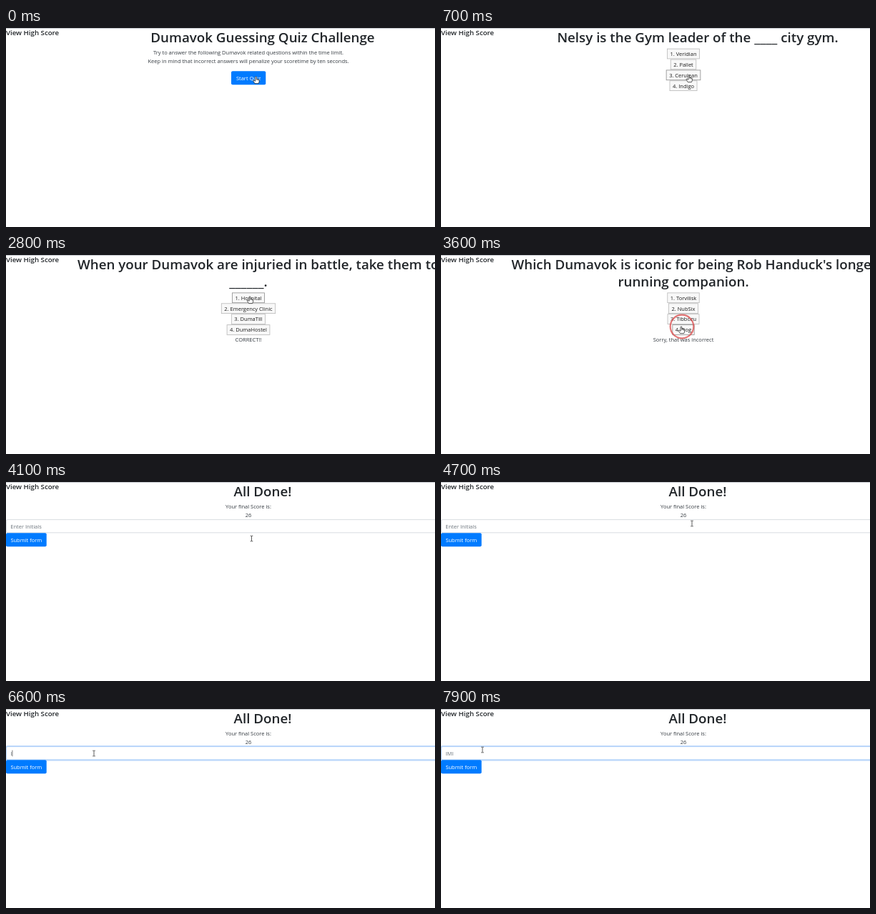
Write an HTML page that moves like this. It is 600x278 px and loops after 8000 ms.

```html
<!DOCTYPE html>
<html lang="en">
<head>
<meta charset="utf-8">
<title>Quiz</title>
<style>
  html, body { margin: 0; width: 100%; height: 100%; overflow: hidden; background: #fff; }
  svg { display: block; width: 600px; height: 278px; font: 7.5px "Open Sans", "Noto Sans", sans-serif; }
  text { fill: #343a40; white-space: pre; }
  .h1 { font-size: 18.75px; font-weight: 600; fill: #212529; }
  .nav { font-size: 9.7px; font-weight: 600; fill: #212529; }
  .mid { text-anchor: middle; }
  .label { fill: #1c1c1c; }
  .light { fill: #fff; }
  .hint { fill: #6c757d; }
  .blue { fill: #007bff; }
  .opt { fill: #f8f8f8; stroke: #b8b8b8; stroke-width: .8; }
  .opt.hot { stroke: #8c8c8c; }
  .field { fill: #fff; stroke: #ced4da; stroke-width: .8; }
  .glow { fill: none; stroke: #c0dafb; stroke-width: 2.6; }
  .field.on { stroke: #a6cbf9; }
</style>
</head>
<body>
<svg id="stage" viewBox="0 0 600 278">
  <rect width="600" height="1" fill="#c3c6cb"/>
  <text class="nav" x="0" y="10.3">View High Score</text>
  <g id="scenes"></g>
  <circle id="ring" fill="none" stroke="#dd5454" stroke-width="2.2"/>
  <g id="hand">
    <path d="M-.9 .4Q0-.7 .9 .4V3.3L2.2 3.4 3.5 3.8 4.6 4.5V7.2L3.7 9.6H-1.5L-3.7 6.1Q-3.9 4.9-2.7 5.1L-.9 6.3Z"
      fill="#fff" stroke="#222" stroke-width=".75" stroke-linejoin="round"/>
    <path d="M.9 3.3V5.2M2.3 3.6V5.3M3.5 3.9V5.4" stroke="#222" stroke-width=".5"/>
  </g>
  <path id="beam" d="M-1.8-3.8H-.5L0-3.4L.5-3.8H1.8M0-3.4V3.4M-1.8 3.8H-.5L0 3.4L.5 3.8H1.8"
    fill="none" stroke="#333" stroke-width=".8"/>
</svg>
<script>
const $ = id => document.getElementById(id);
const MID = 339, HEAD = 359, LOOP = 8000, STEP = 100;

function add(parent, tag, attrs, label) {
  const el = document.createElementNS("http://www.w3.org/2000/svg", tag);
  for (const k in attrs) el.setAttribute(k, attrs[k]);
  if (label !== undefined) el.textContent = label;
  return parent.appendChild(el);
}
const scene = () => add($("scenes"), "g", {});
const show = (el, on) => el.setAttribute("visibility", on ? "visible" : "hidden");
const centred = (g, y, s, x = MID, cls = "mid") => add(g, "text", { class: cls, x, y }, s);
const heading = (g, y, s, x = HEAD) => centred(g, y, s, x, "h1 mid");

function button(g, x, y, w, label) {
  add(g, "rect", { class: "blue", x, y, width: w, height: 19, rx: 2 });
  centred(g, y + 12.5, label, x + w / 2, "light mid");
}

// Stacked answer buttons sized to their labels, with a feedback line below
function answers(g, top, labels, hot) {
  labels.forEach((s, i) => {
    const y = top + i * 14.9;
    const box = add(g, "rect", { class: i === hot ? "opt hot" : "opt", y, height: 13.8 });
    const label = centred(g, y + 9.7, `${i + 1}. ${s}`, MID, "label mid");
    const w = label.getComputedTextLength() + 8;
    box.setAttribute("x", MID - w / 2);
    box.setAttribute("width", w);
  });
  return centred(g, top + 68.2, "");
}

const intro = scene();
heading(intro, 20.4, "Dumavok Guessing Quiz Challenge");
centred(intro, 37.3, "Try to answer the following Dumavok related questions within the time limit.");
centred(intro, 49.3, "Keep in mind that incorrect answers will penalize your scoretime by ten seconds.");
button(intro, 315, 60.3, 48.3, "Start Quiz");

const gym = scene();
heading(gym, 20.4, "Nelsy is the Gym leader of the ____ city gym.");
const gymNote = answers(gym, 29.1, ["Veridian", "Pallet", "Cerulean", "Indigo"], 2);

const care = scene();
add(care, "text", { class: "h1", x: 100, y: 20.4 }, "When your Dumavok are injuried in battle, take them to");
heading(care, 44.2, "______.", MID);
const careNote = answers(care, 52.9, ["Hospital", "Emergency Clinic", "DumaTill", "DumaHostel"], 0);

const pal = scene();
add(pal, "text", { class: "h1", x: 98.5, y: 20.4 }, "Which Dumavok is iconic for being Rob Handuck's longest");
heading(pal, 44.2, "running companion.", MID);
const palNote = answers(pal, 52.9, ["Torvilisk", "NubSix", "Tibbozu", "Dog"], 3);

const done = scene();
heading(done, 20.4, "All Done!");
centred(done, 37.3, "Your final Score is:");
centred(done, 49.3, "26");
const glow = add(done, "rect", { class: "glow", x: .4, y: 52.2, width: 678, height: 19, rx: 2.4 });
const field = add(done, "rect", { x: .4, y: 52.6, width: 678, height: 18.2, rx: 2 });
const entry = add(done, "text", { class: "hint", x: 6.3, y: 64.8 });
const caret = add(done, "rect", { y: 57.6, width: .7, height: 8.6, fill: "#444" });
button(done, 0, 71.2, 56.7, "Submit form");

const WRONG = "Sorry, that was incorrect";
const scenes = [[0, intro], [400, gym], [2400, care], [3200, pal], [4100, done]];
const clicks = [200, 1300, 2900, 3400, 5500];
const FOCUS = 5600;
const typed = [[0, "Enter Initials"], [6500, "I"], [6900, "IM"], [7200, "IMI"]];
const path = [
  [0, 349.5, 68], [400, 349.5, 68], [1000, 344, 64], [2200, 344, 64], [2700, 341, 58],
  [3000, 341, 58], [3400, 336, 100], [3800, 336, 100], [4400, 351, 58], [5000, 351, 58],
  [5500, 123, 62], [7300, 123, 62], [7900, 58, 57], [8000, 58, 57]
];

const latest = (list, t) => list.filter(e => e[0] <= t).pop()[1];

function pointer(t) {
  const i = path.findIndex(p => p[0] > t), [a, x, y] = path[i - 1], [b, u, v] = path[i];
  const k = (t - a) / (b - a), e = k * k * (3 - 2 * k);
  return [x + (u - x) * e, y + (v - y) * e];
}

function draw(t) {
  const now = latest(scenes, t);
  for (const [, g] of scenes) g.style.display = g === now ? "" : "none";
  gymNote.textContent = t >= 1400 ? "CORRECT!!" : "";
  careNote.textContent = t >= 3000 ? WRONG : "CORRECT!!";
  palNote.textContent = WRONG;

  const focused = t >= FOCUS, value = latest(typed, t), empty = t < typed[1][0];
  show(glow, focused);
  field.setAttribute("class", focused ? "field on" : "field");
  if (entry.textContent !== value) entry.textContent = value;
  if (now === done) caret.setAttribute("x", 6.5 + (empty ? 0 : entry.getComputedTextLength()));
  show(caret, focused && t < 7700 && (t - FOCUS) % 1000 < 500 || t >= 6500 && t < 7300);

  const [x, y] = pointer(t), beam = now === done;
  show($("hand"), !beam);
  show($("beam"), beam);
  for (const id of ["hand", "beam"]) $(id).setAttribute("transform", `translate(${x} ${y})`);

  const hit = clicks.find(c => t >= c && t < c + 400), ring = $("ring");
  show(ring, hit !== undefined);
  if (hit !== undefined) {
    const age = t - hit;
    ring.setAttribute("cx", x + 1);
    ring.setAttribute("cy", y);
    ring.setAttribute("r", 6 + 10.3 * Math.min(1, age / 200));
    ring.setAttribute("opacity", age > 200 ? .45 : .8);
  }
}

const start = performance.now();
function tick() {
  const t = Math.max(0, performance.now() - start) % LOOP;
  draw(Math.floor(t / STEP) * STEP);
  requestAnimationFrame(tick);
}
tick();
</script>
</body>
</html>
```
